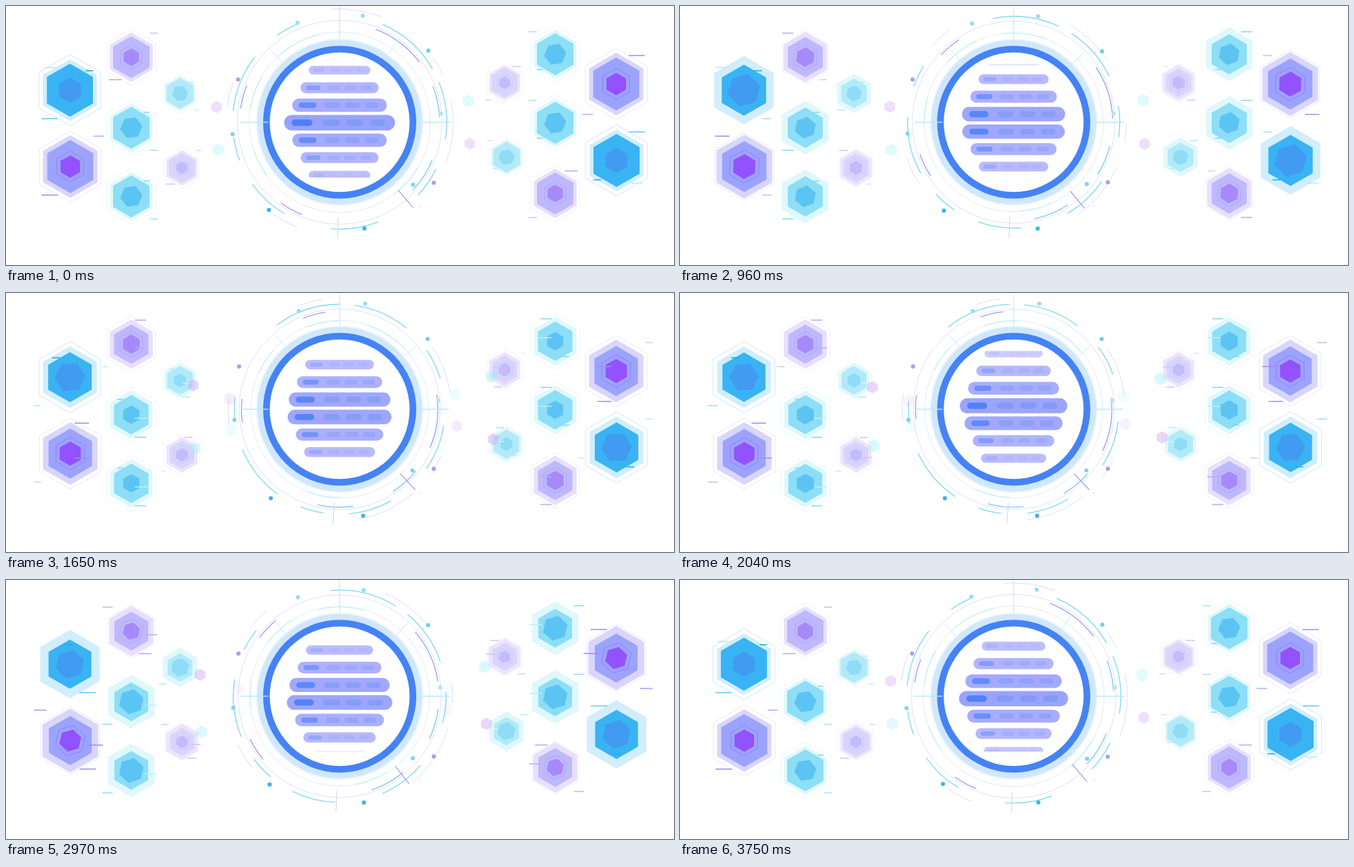
Write an HTML page with a canvas that moves like this. It is 1029x400 px and loops after 3.78 s.

```html
<!DOCTYPE html>
<html>
<head>
<meta charset="utf-8">
<style>
html, body { margin: 0; width: 100%; height: 100%; overflow: hidden; background: #fff; }
canvas { display: block; }
</style>
</head>
<body>
<canvas id="stage" width="1029" height="400"></canvas>
<script>
const g = document.getElementById('stage').getContext('2d');
const TAU = Math.PI * 2, RAD = Math.PI / 180;
const STEP = 30, STEPS = 126;
const CX = 514, CY = 179.5;

const wave = (u, period, peak = 0) => Math.cos(TAU * (u - peak) / period);
const smooth = x => { x = Math.min(1, Math.max(0, x)); return x * x * (3 - 2 * x); };

// Horizontal dashes sliding past a hexagon: start, speed, wrap, range, width
const DASH = {
  slow: { at: -95, v: .075, wrap: 153, lo: -56, hi: 52, w: 22 },
  base: { at: -19, v: .075, wrap: 150, lo: -56, hi: 42, w: 25 },
  fast: { at: -90, v: .18, wrap: 175, lo: -59, hi: 51, w: 25 },
  tick: { at: 36, v: .13, wrap: 133, lo: -49, hi: 53, w: 12 },
  glow: { at: -23, v: .15, wrap: 148, lo: -55, hi: 53, w: 17 }
};

const violetDashes = c => [['slow', -47, c], ['base', 44, c], ['fast', 7, c]];
const cyanDashes = (c, pale) => [['tick', -30, c], ['fast', 7, pale], ['slow', 44, c]];

const HEXES = [
  { x: 98.5, y: 130, k: 1, kind: 'blue', core: '#39b3f4', halo: '#d0eefd', line: '#cfe3fa', inner: '#419bf1',
    dashes: [['tick', -30, '#27a9dd'], ['glow', -35, '#b5e9fa'], ['base', 44, '#5ccbf0']] },
  { x: 99, y: 248, k: 1, kind: 'violet', core: '#9ca3fd', halo: '#d9d6fd', line: '#ece4fc', inner: '#9252fd',
    dashes: violetDashes('#9b8ef0') },
  { x: 193, y: 79, k: .79, kind: 'violet', core: '#beb9fd', halo: '#e8e0fc', line: '#f3edfd', inner: '#a78afa',
    dashes: violetDashes('#b9abf4') },
  { x: 193, y: 188, k: .79, kind: 'cyan', core: '#8ddef7', halo: '#e0f8fc', line: '#e6f9fc', inner: '#5cc4f2',
    dashes: cyanDashes('#80d9f3', '#bdf0fa') },
  { x: 193, y: 294, k: .79, kind: 'cyan', core: '#8ddef7', halo: '#e0f8fc', line: '#e6f9fc', inner: '#5cc4f2',
    dashes: cyanDashes('#80d9f3', '#bdf0fa') },
  { x: 268, y: 135, k: .58, kind: 'cyan', core: '#b2eaf9', halo: '#e0f8fc', line: '#eefbfd', inner: '#8edcf6',
    dashes: cyanDashes('#b0eaf7', '#d5f6fb') },
  { x: 271, y: 250, k: .57, kind: 'violet', core: '#d8d6fc', halo: '#eee5fc', line: '#f6f0fd', inner: '#c5bbfb',
    dashes: violetDashes('#d2c5f7') }
];

const SPAWNS = [-370, 150, 600, 1130, 1550];

// Rotating arcs: radius, turn direction, colour, width, [from, to] in degrees
const ARCS = [
  [175, 1, '#dfdaf6', 1, [[-94.6, -68.6], [188, 201], [-11.4, 20.8], [112, 126], [-35, -25]]],
  [165, -1, '#8bdcf4', 1.6, [[234.4, 246.8], [-66.4, -30], [186, 217.6], [-22, 9.4], [159, 172], [26, 43], [121, 144.7], [69, 94.6]]],
  [154, 1, '#a4a8f5', 1.6, [[-68.8, -37], [188, 201.6], [112, 126]]],
  [154, 1, '#8acbf5', 1.6, [[-21, -3], [22, 43]]],
  [139, 1, '#c9f1fa', 1.6, [[228, 257], [188, 210], [30, 52], [144, 161]]]
];

// Dots: place, drift over the run, colour
const DOTS = [
  [449, 26, 2, 2, '#97dff4'], [549.5, 15, 4, 1.5, '#97dff4'], [650.5, 69, -1, 2, '#6fd0ee'],
  [357.5, 113.5, 1.5, 0, '#a79ff3'], [349, 198, 3, -2, '#7cd6f1'], [405, 315, 3, 2, '#3bb6ea'],
  [552, 343.5, -2, .5, '#3bb6ea'], [627, 276, -1, -2, '#7cd6f1'], [659, 273, 0, -1.5, '#a79ff3'],
  [670, 166, -4, 0, '#b2e8f7']
];

function hex(x, y, r, turn, fill, stroke) {
  g.beginPath();
  for (let i = 0; i < 6; i++) {
    const a = (turn - 90 + i * 60) * RAD;
    g.lineTo(x + r * Math.cos(a), y + r * Math.sin(a));
  }
  g.closePath();
  if (fill) { g.fillStyle = fill; g.fill(); }
  if (stroke) { g.strokeStyle = stroke; g.lineWidth = 1; g.stroke(); }
}

function disc(x, y, r, fill) {
  g.beginPath();
  g.arc(x, y, r, 0, TAU);
  g.fillStyle = fill;
  g.fill();
}

function arc(r, from, to, color, width) {
  g.beginPath();
  g.arc(0, 0, r, from * RAD, to * RAD);
  g.strokeStyle = color;
  g.lineWidth = width;
  g.stroke();
}

function spoke(deg, r1, r2, color, width) {
  const c = Math.cos(deg * RAD), s = Math.sin(deg * RAD);
  g.beginPath();
  g.moveTo(r1 * c, r1 * s);
  g.lineTo(r2 * c, r2 * s);
  g.strokeStyle = color;
  g.lineWidth = width;
  g.stroke();
}

function pill(x, y, w, h, fill) {
  g.beginPath();
  g.roundRect(x - w / 2, y - h / 2, w, h, h / 2);
  g.fillStyle = fill;
  g.fill();
}

function drawDash(h, [name, dy, color], u) {
  const d = DASH[name];
  const shift = (d.at + d.v * u - d.lo) % d.wrap;
  const right = d.lo + (shift + d.wrap) % d.wrap;
  const a = Math.max(d.lo, right - d.w), b = Math.min(d.hi, right);
  if (b <= a) return;
  g.globalAlpha = (b - a) / d.w;
  g.fillStyle = color;
  g.fillRect(h.x + a * h.k, h.y + dy * h.k - .8, (b - a) * h.k, 1.6);
  g.globalAlpha = 1;
}

function drawHex(h, u) {
  const { x, y, k, kind } = h;
  const swell = wave(u, 1800, -60);
  const haloR = kind === 'violet' ? 49 - .6 * swell : 49.9 - 2.2 * swell;
  hex(x, y, k * (53.6 + 1.4 * swell), 0, null, h.line);
  hex(x, y, k * haloR, 0, h.halo);
  hex(x, y, k * (39.3 + 1.7 * wave(u, 1260)), 0, h.core);
  if (kind === 'violet') {
    const turn = 60 * Math.max(0, 1 - u / 1000);
    const r = 17.3 + 9.2 * Math.exp(-(((u - 1290) / 270) ** 2));
    g.globalAlpha = .5;
    hex(x, y, k * (r + 6.5), turn, null, h.inner);
    g.globalAlpha = 1;
    hex(x, y, k * r, turn, h.inner);
  } else if (kind === 'cyan') {
    hex(x, y, k * Math.max(16.5, 22 + 6 * wave(u, 1850, 470)), 22 * (1 - u / 1750), h.inner);
  } else {
    hex(x, y, Math.max(17, 22.5 - 5.6 * wave(u, 1900, 300)), u * .016, h.inner);
  }
  for (const d of h.dashes) drawDash(h, d, u);
}

function drawParticles(u) {
  for (const spawn of SPAWNS) {
    const d = 7 + .134 * (u - spawn);
    if (d < 0 || d > 108) continue;
    g.globalAlpha = Math.min(1, d / 8, (108 - d) / 65);
    hex(268 + d, 135 + .37 * d, 9.5, 0, 'rgba(206,160,246,.42)');
    hex(270.5 + d, 250 - .5 * d, 10, 0, 'rgba(150,240,246,.36)');
  }
  g.globalAlpha = 1;
}

function drawSide(u) {
  for (const h of HEXES) drawHex(h, u);
  drawParticles(u);
}

function drawRing(u) {
  const ease = (1 - Math.cos(Math.PI * u / 1890)) / 2;
  const scale = 1 - .018 * ease;
  const turn = .0364 * u;
  g.save();
  g.translate(CX, CY);
  g.save();
  g.scale(scale, scale);
  arc(157.5, 0, 360, '#e1def3', 1);
  arc(139.5, 0, 360, '#e1e8f6', 1);
  for (const [r, dir, color, width, spans] of ARCS)
    for (const [a, b] of spans) arc(r, a + dir * turn, b + dir * turn, color, width);
  spoke(-90, 127, 180, '#bfe9f8', 1.2);
  spoke(91 + 2.3 * smooth((u - 300) / 1200), 147, 180, '#dcd5f1', 1.3);
  spoke(49.5 + 2.6 * wave(u, 2200, 570), 139, 173.5, '#a49cf1', 1.3);
  spoke(226.5 + 2.6 * smooth(u / 600), 123, 154, '#d5edf8', 1.2);
  spoke(-54.5 + 15 * smooth(u / 1600), 128, 156, '#d2f0f9', 1.2);
  g.restore();
  for (const [x, y, dx, dy, color] of DOTS)
    disc(x + dx * ease - CX, y + dy * ease - CY, 3.2, color);
  disc(123.5, 129.5, .8, '#c3b8ee');
  disc(0, 0, 129, '#e9f7fe');
  disc(0, 0, 127, '#d0e7fd');
  disc(0, 0, 118, '#4583f5');
  disc(0, 0, 107.7, '#fff');
  spoke(180, 110, 154 * scale, '#b3eaf9', 1.5);
  spoke(0, 127, 171 * scale, '#b3eaf9', 1.5);
  g.restore();
}

function drawBars(t) {
  const mid = 180.2 - .04 * (t % 630);
  g.save();
  g.beginPath();
  g.rect(400, 89.5, 228, 175.5);
  g.clip();
  for (let i = -4; i <= 4; i++) {
    const y = mid + 27 * i;
    const dist = Math.abs(y - 180);
    if (dist > 100) continue;
    const k = 1 - .0055 * dist;
    const tone = Math.min(1, dist / 81);
    const fade = Math.min(1, (102 - dist) / 20);
    g.globalAlpha = fade;
    pill(CX - .2, y, 171 * k, 24 * k, `rgb(${152 + 40 * tone},${162 + 28 * tone},254)`);
    g.globalAlpha = fade * Math.max(.15, (k - .48) / .52);
    pill(CX - 58 * k, y, 32 * k, 10 * k, '#4d80f8');
    g.globalAlpha *= .65;
    for (const [x, w] of [[-13, 27], [23, 26], [58, 24]])
      pill(CX + x * k, y, w * k, 10 * k, '#7896f6');
    g.globalAlpha = 1;
  }
  g.restore();
}

function draw(now) {
  const i = Math.floor(now / STEP) % STEPS;
  // Everything but the bars runs forth and back
  const u = Math.min(i, STEPS - 1 - i) * STEP;
  g.fillStyle = '#fff';
  g.fillRect(0, 0, 1029, 400);
  drawRing(u);
  drawBars(i * STEP);
  drawSide(u);
  g.save();
  g.translate(1039, 368.5);
  g.rotate(Math.PI);
  drawSide(u);
  g.restore();
}

let start;
function loop(now) {
  start ??= now;
  draw(now - start);
  requestAnimationFrame(loop);
}
draw(0);
requestAnimationFrame(loop);
</script>
</body>
</html>
```
